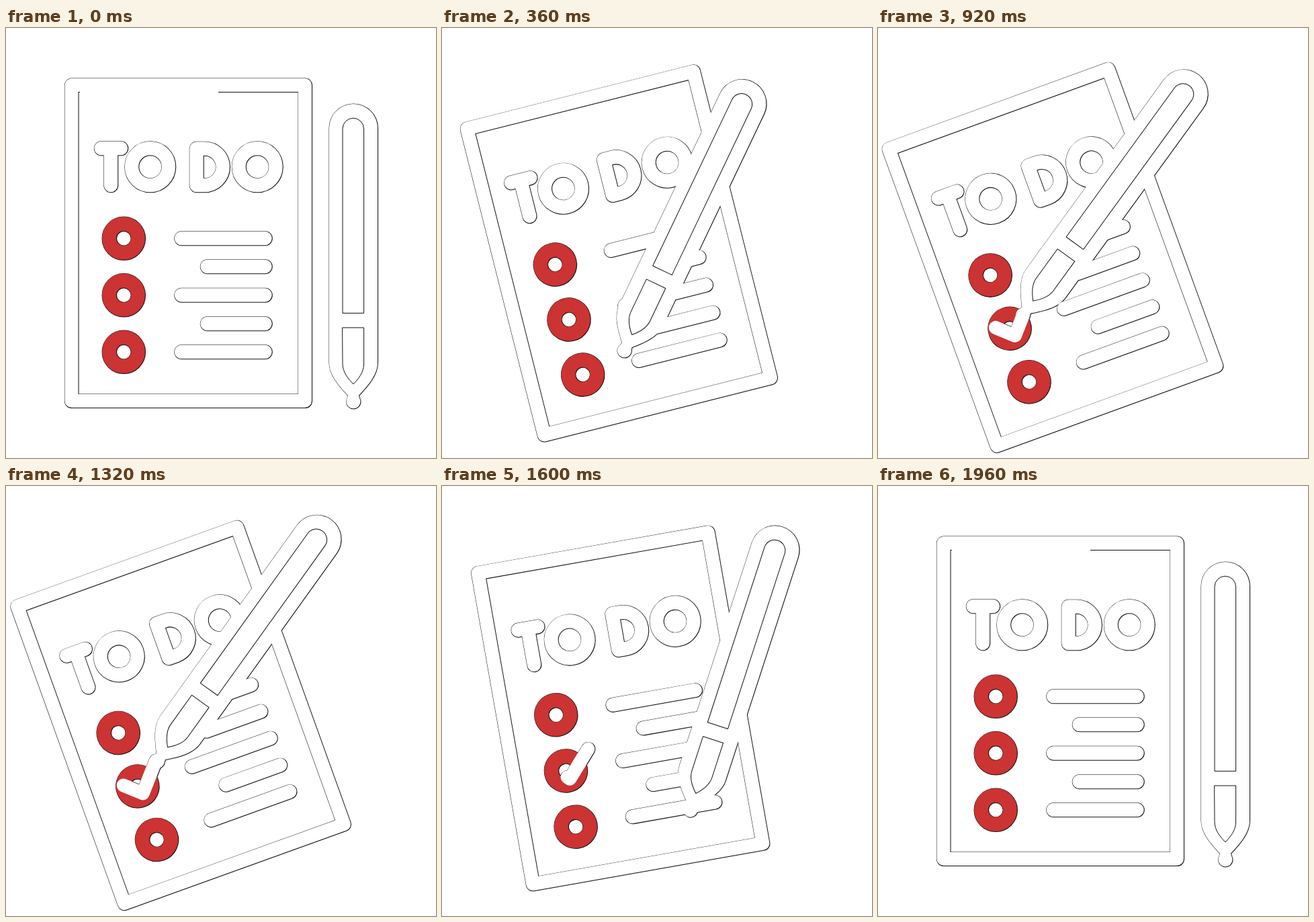
An HTML page with a canvas that plays this animation: 640 by 640 pixels, repeating every 2 s.

```html
<!DOCTYPE html>
<html lang="en">
<head>
<meta charset="utf-8">
<title>To do</title>
<style>
html, body { margin: 0; height: 100%; overflow: hidden; background: #fff; }
canvas { display: block; }
</style>
</head>
<body>
<canvas id="stage" width="640" height="640"></canvas>
<script>
const ctx = document.getElementById('stage').getContext('2d');
const LOOP = 2000, STEP = 40;
const INK = '#111', WHITE = '#fff', RED = '#cc3333';
const CENTRE = [271.5, 320];

const ring = (x, y, r) => `M${x - r} ${y}a${r} ${r} 0 1 1 ${2 * r} 0a${r} ${r} 0 1 1 ${-2 * r} 0Z`;

const sheet = new Path2D('M97.5 85H445V555H97.5Z');
const marks = new Path2D(
  'M141.5 179H171M156 179V234' + ring(214.5, 206.5, 27.5) +
  'M283.5 179.5H295.5A27.2 27.2 0 0 1 295.5 234H283.5Z' + ring(374, 206.5, 27.5) +
  [313, 355, 397.5, 440, 482].map((y, i) => `M${i % 2 ? 299.5 : 261} ${y}H385.5`).join(''));
const bullets = new Path2D([313, 397.5, 482].map(y => ring(175, y, 21.5)).join(''));

const tick = new Path2D('M155.8 389.2L179 410.4L213.4 371.4');
const TICK_LENGTH = Math.hypot(23.2, 21.2) + Math.hypot(34.4, 39);

// The pen is drawn around the middle of its tip
const penBody = new Path2D('M-36 -407A36 36 0 0 1 36 -407V-58C36 -40 22 -24 8 -9L9 -5.5' +
  'A10.5 10.5 0 1 1 -9 -5.5L-8 -9C-22 -24 -36 -40 -36 -58Z');
const penHoles = new Path2D('M-16 -132V-406A15.8 15.8 0 0 1 15.6 -406V-132Z' +
  'M-16 -110H15.6V-56C15.6 -44 8 -34 0 -26C-8 -34 -16 -44 -16 -56Z');

const REST = [517, 556], START = [172, 444], BEND = [204, 458], END = [222.5, 408.5];
const BEND_AT = 0.38;

const ease = (t, from, to) => {
  const p = Math.min(1, Math.max(0, (t - from) / (to - from)));
  return (1 - Math.cos(Math.PI * p)) / 2;
};
const mix = (a, b, p) => a.map((v, i) => v + (b[i] - v) * p);

function penTip(arrive, write, leave) {
  if (leave) return mix(END, REST, leave);
  if (write > BEND_AT) return mix(BEND, END, (write - BEND_AT) / (1 - BEND_AT));
  if (write) return mix(START, BEND, write / BEND_AT);
  const bow = 2 * arrive * (1 - arrive);
  const [x, y] = mix(REST, START, arrive);
  return [x - 3.5 * bow, y + 8 * bow];
}

function stroke(path, width, color) {
  ctx.lineWidth = width;
  ctx.strokeStyle = color;
  ctx.stroke(path);
}

function inPaper(turn, draw) {
  ctx.save();
  ctx.translate(CENTRE[0] - 11.5 * turn, CENTRE[1] + 21.3 * turn);
  ctx.rotate(-turn * Math.PI / 9);
  ctx.translate(-CENTRE[0], -CENTRE[1]);
  draw();
  ctx.restore();
}

function inPen(tip, turn, draw) {
  ctx.save();
  ctx.translate(...tip);
  ctx.rotate(turn * Math.PI / 5);
  draw();
  ctx.restore();
}

function drawPaper(grow, bulletColor, color, from, to) {
  stroke(bullets, 21 + grow, bulletColor);
  stroke(sheet, 20 + grow, color);
  stroke(marks, 20.5 + grow, color);
  if (to - from < 0.002) return;
  ctx.setLineDash([TICK_LENGTH * (to - from), 999]);
  ctx.lineDashOffset = -TICK_LENGTH * from;
  stroke(tick, 20 + grow, color);
}

function render(t) {
  const arrive = ease(t, 80, 520);
  const write = ease(t, 540, 1100);
  const leave = ease(t, 1280, 1920);
  const erase = ease(t, 1400, 1920);
  const turn = arrive - leave;
  const tip = penTip(arrive, write, leave);

  ctx.fillStyle = WHITE;
  ctx.fillRect(0, 0, 640, 640);
  ctx.lineCap = ctx.lineJoin = 'round';

  // Dark silhouette, slightly larger and shifted, leaves one outline around the union
  ctx.save();
  ctx.translate(0.3, 0.3);
  inPaper(turn, () => drawPaper(1.5, INK, INK, erase, write));
  inPen(tip, turn, () => stroke(penBody, 1.5, INK));
  ctx.restore();

  inPaper(turn, () => {
    drawPaper(0, RED, WHITE, erase, write);
    // The inner top edge is half open at rest
    if (turn < 0.001) ctx.fillRect(110, 93, 206, 5);
  });
  inPen(tip, turn, () => {
    ctx.fill(penBody);
    stroke(penHoles, 1, INK);
  });
}

function frame() {
  render(Math.floor(performance.now() % LOOP / STEP) * STEP);
  requestAnimationFrame(frame);
}
frame();
</script>
</body>
</html>
```
